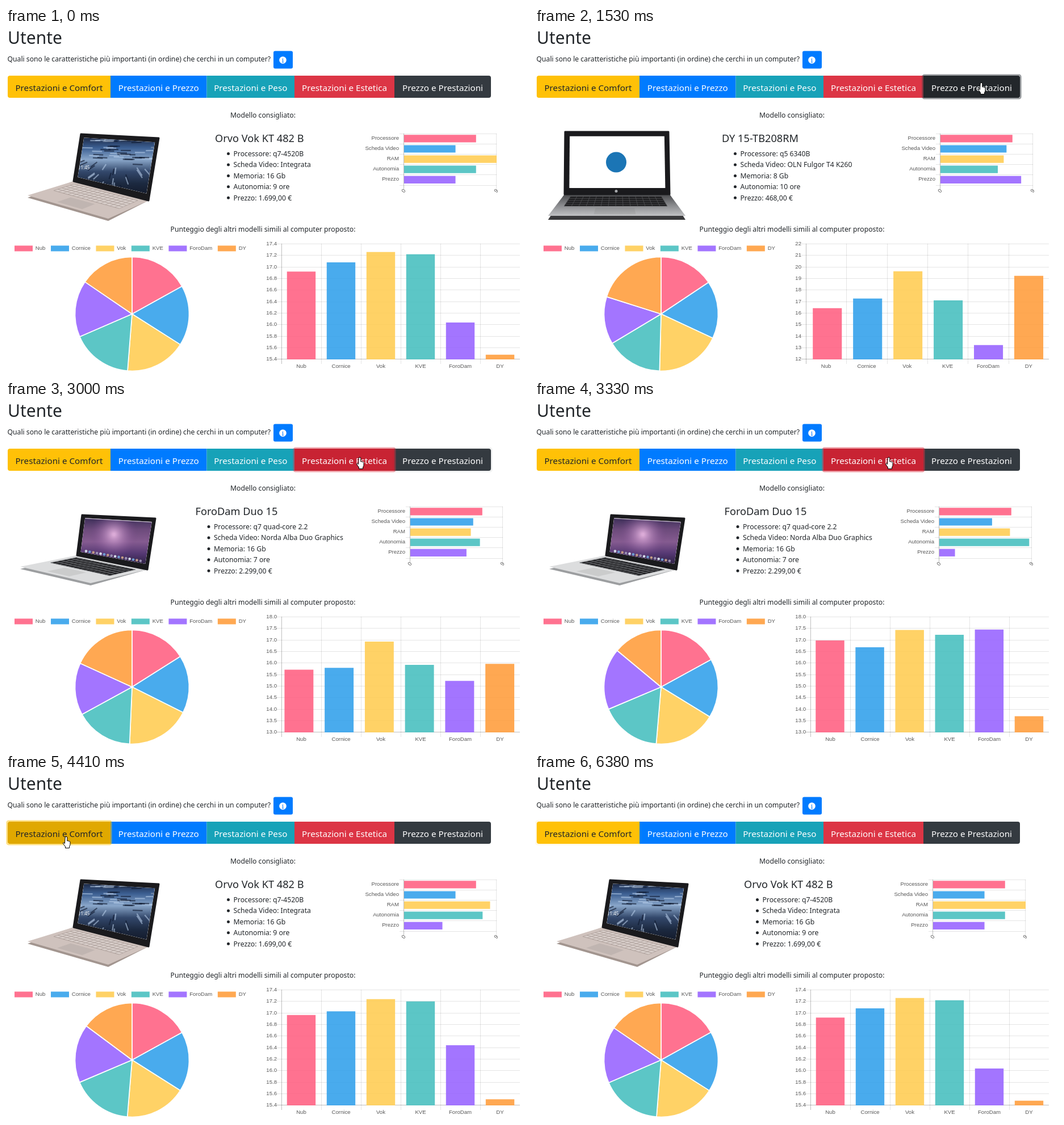
Recreate the animation shown at these times as an HTML page with a canvas. Size 921x608 px, loop 6.48 s.

```html
<!DOCTYPE html>
<html lang="it">
<head>
<meta charset="utf-8">
<title>Utente</title>
<style>
  html, body { margin: 0; width: 100%; height: 100%; overflow: hidden; background: #fff; }
  canvas { display: block; }
</style>
</head>
<body>
<canvas id="stage" width="921" height="608"></canvas>
<script>
const ctx = document.getElementById("stage").getContext("2d");
const LOOP = 6480, CHART_SPAN = 920, FADE = 150;
const INK = "#212529", GRID = "rgba(0,0,0,.1)", AXIS = "rgba(0,0,0,.25)";
const UI = '"Noto Sans", sans-serif', CHART = '"Liberation Sans", Arial, sans-serif';
const COLORS = ["255,99,132", "54,162,235", "255,206,86", "75,192,192", "153,102,255", "255,159,64"].map(c => `rgba(${c},.9)`);
const BRANDS = ["Nub", "Cornice", "Vok", "KVE", "ForoDam", "DY"];
const TRAITS = ["Processore", "Scheda Video", "RAM", "Autonomia", "Prezzo"];
const SPECS = ["Processore", "Scheda Video", "Memoria", "Autonomia", "Prezzo"];

const BUTTONS = [
  { label: "Prestazioni e Comfort", end: 184, rgb: "255,193,7", dark: "#e0a800", ink: INK },
  { label: "Prestazioni e Prezzo", end: 353.5, rgb: "0,123,255", dark: "#0069d9" },
  { label: "Prestazioni e Peso", end: 508, rgb: "23,162,184", dark: "#138496" },
  { label: "Prestazioni e Estetica", end: 684, rgb: "220,53,69", dark: "#c82333" },
  { label: "Prezzo e Prestazioni", end: 854, rgb: "52,58,64", dark: "#23272b" }
];
BUTTONS.forEach((b, i) => b.x = i ? BUTTONS[i - 1].end : 3);
const [COMFORT, , , STYLE, PRICE] = BUTTONS;

const slim = {
  title: "Orvo Vok KT 482 B", x: 368, axisX: 701, photo: slimPhoto,
  specs: ["q7-4520B", "Integrata", "16 Gb", "9 ore", "1.699,00 €"],
  rating: [7, 5, 9, 7, 5], share: [16.92, 17.08, 17.26, 17.22, 16.04, 15.48]
};
const budget = {
  title: "DY 15-TB208RM", x: 329, axisX: 714, photo: budgetPhoto,
  specs: ["q5 6340B", "OLN Fulgor T4 K260", "8 Gb", "10 ore", "468,00 €"],
  rating: [7, 7, 5, 5, 9], share: [15.15, 16, 18.95, 15.5, 12.45, 22]
};
const silver = {
  title: "ForoDam Duo 15", x: 333.5, axisX: 712, photo: silverPhoto,
  specs: ["q7 quad-core 2.2", "Norda Alba Duo Graphics", "16 Gb", "7 ore", "2.299,00 €"],
  rating: [7, 5, 7, 9, 1], share: [17.15, 16.8, 17.5, 17.4, 17.75, 13.4]
};
const PHASES = [
  { at: -1000, model: slim },
  { at: 1285, model: budget, focus: PRICE },
  { at: 2876, model: silver, focus: STYLE },
  { at: 4182, model: slim, focus: COMFORT },
  { at: 6265, model: slim }
];
const MOVES = [
  { from: 400, to: 640, x: 706, y: 94 },
  { from: 640, to: 880, x: 819, y: 95 },
  { from: 1480, to: 1860, x: 725, y: 101 },
  { from: 1980, to: 2430, x: 623, y: 100 },
  { from: 3530, to: 3900, x: 106, y: 111 },
  { from: 4440, to: 4570, x: 30, y: 150 }
];
const HAND = new Path2D("M-1.8 1a1.8 1.8 0 0 1 3.6 0V7l1-.3 1.6.5 1 .3 1.6 1V14l-1.5 3v2.5h-7V17l-3.6-5q-1-2 .6-2.2l1.9 1.7z");
const ARROW = new Path2D("M0 0V14l3.3-3 2.2 5 2-1-2.2-4.8H10z");

const clamp = v => Math.max(0, Math.min(1, v));
const mix = (a, b, p) => a + (b - a) * p;
const mixAll = (a, b, p) => a.map((v, i) => mix(v, b[i], p));
const easeOut = (v, power) => 1 - (1 - clamp(v)) ** power;
const random = seed => Math.abs(Math.sin(seed * 91.7) * 43758.5) % 1;
const times = (n, draw) => { for (let i = 0; i < n; i++) draw(i); };

function text(str, x, y, size, { font = UI, color = INK, align = "left", base = "alphabetic" } = {}) {
  ctx.font = `${size}px ${font}`;
  ctx.fillStyle = color;
  ctx.textAlign = align;
  ctx.textBaseline = base;
  ctx.fillText(str, x, y);
}
const chartText = (str, x, y, align) => text(str, x, y, 9.6, { font: CHART, color: "#595959", align, base: "middle" });
function chartWidth(str) {
  ctx.font = `9.6px ${CHART}`;
  return ctx.measureText(str).width;
}
function rect(x, y, w, h, fill, radius = 0) {
  ctx.fillStyle = fill;
  ctx.beginPath();
  ctx.roundRect(x, y, w, h, radius);
  ctx.fill();
}
function disc(x, y, r, fill) {
  ctx.fillStyle = fill;
  ctx.beginPath();
  ctx.arc(x, y, r, 0, 7);
  ctx.fill();
}
function line(x1, y1, x2, y2, color = GRID, width = 1) {
  ctx.strokeStyle = color;
  ctx.lineWidth = width;
  ctx.beginPath();
  ctx.moveTo(x1, y1);
  ctx.lineTo(x2, y2);
  ctx.stroke();
}
function poly(points, fill) {
  ctx.fillStyle = fill;
  ctx.beginPath();
  points.forEach(p => ctx.lineTo(...p));
  ctx.closePath();
  ctx.fill();
}
function fade(y1, y2, ...colors) {
  const g = ctx.createLinearGradient(0, y1, 0, y2);
  colors.forEach((c, i) => g.addColorStop(i / (colors.length - 1), c));
  return g;
}

// A quad is [top left, top right, bottom right, bottom left]; u and v run from 0 to 1 across it.
const at = ([a, b, c, d], u, v) => mixAll(mixAll(a, b, u), mixAll(d, c, u), v);
const patch = (quad, u1, v1, u2, v2) => [[u1, v1], [u2, v1], [u2, v2], [u1, v2]].map(([u, v]) => at(quad, u, v));

function laptop({ top, hinge, front, thick, shell, edge, keys, gap }, paintScreen) {
  const lid = [...top, hinge[1], hinge[0]], deck = [...hinge, front[1], front[0]];
  poly([hinge[0], hinge[1], ...[1, 0].map(i => [front[i][0], front[i][1] + thick])], edge);
  poly(deck, shell);
  const keyboard = patch(deck, .07, .1, .91, .55);
  poly(keyboard, keys);
  times(15, i => line(...at(keyboard, i / 14, 0), ...at(keyboard, i / 14, 1), gap, .7));
  times(6, i => line(...at(keyboard, 0, i / 5), ...at(keyboard, 1, i / 5), gap, .9));
  poly(patch(deck, .33, .63, .64, .93), "rgba(110,110,115,.16)");
  ctx.lineJoin = "round";
  ctx.lineWidth = 3;
  ctx.strokeStyle = "#1a1a1d";
  poly(lid, "#1a1a1d");
  ctx.stroke();
  const screen = patch(lid, .045, .07, .96, .9);
  ctx.save();
  poly(screen, "#fff");
  ctx.clip();
  paintScreen(screen);
  ctx.restore();
}

function slimPhoto() {
  laptop({
    top: [[132, 187], [269, 194]], hinge: [[119, 270], [251, 304]], front: [[38, 295], [180, 336]],
    thick: 4, shell: "#cfc2bd", edge: "#a2958f", keys: "#d8ceca", gap: "#a89a95"
  }, screen => {
    poly(screen, fade(190, 295, "#172039", "#3c5f92", "#8aa7ca", "#33486b", "#1c2940", "#131a2a"));
    times(70, i => {
      const u = random(i + 1), v = random(i + 101), dark = i % 2;
      const spread = (u - .5) * .3;
      line(...at(screen, u, v), ...at(screen, u + (v > .5 ? spread : .14), v + (v > .5 ? .14 : -.02)),
        dark ? "rgba(14,24,46,.6)" : "rgba(190,212,238,.55)", 2.2);
    });
    text("11:45", 127, 249, 8, { color: "#fff" });
  });
}

function budgetPhoto() {
  laptop({
    top: [[53, 183], [235, 183]], hinge: [[52, 293], [237, 293]], front: [[23, 331], [265, 331]],
    thick: 7, shell: fade(293, 331, "#48494c", "#88898c", "#c0c1c3"), edge: "#3a3a3c", keys: "#19191b", gap: "#58595c"
  }, () => disc(143, 236.5, 18, "#1b75b5"));
  disc(143, 287.5, 2.5, "#a7a9ac");
}

function silverPhoto() {
  laptop({
    top: [[134, 201], [263, 207]], hinge: [[125, 272], [249, 297]], front: [[25, 292], [149, 321]],
    thick: 4, shell: "#dcddde", edge: "#9c9ea0", keys: "#1c1c1f", gap: "#727478"
  }, screen => {
    poly(screen, fade(206, 290, "#3c2e58", "#6d4b7c", "#855b90", "#553873", "#281e3e"));
    const glow = ctx.createRadialGradient(190, 235, 2, 190, 235, 42);
    glow.addColorStop(0, "rgba(244,193,236,.8)");
    glow.addColorStop(1, "rgba(120,70,140,0)");
    poly(screen, glow);
    line(...at(screen, 0, 0), ...at(screen, 1, 0), "#d5cadb", 2);
    times(16, i => disc(...at(screen, .08 + i * .056, .95), 2.3, ["#d6dce8", "#6f9ed2", "#c19b85", "#9a91b2"][i % 4]));
  });
}

const phaseIndex = t => PHASES.findLastIndex(p => t >= p.at);

function pointerAt(t) {
  const end = MOVES.at(-1).to;
  if (t < MOVES[0].from || t > end) return null;
  const index = MOVES.findLastIndex(m => t >= m.from);
  const move = MOVES[index], start = MOVES[index - 1] || { x: 920, y: 73 };
  const p = easeOut((t - move.from) / (move.to - move.from), 3);
  return { x: mix(start.x, move.x, p), y: mix(start.y, move.y, p) };
}
function hoveredAt(t) {
  const p = pointerAt(t);
  return p && p.y >= 84 && p.y < 123 ? BUTTONS.find(b => p.x >= b.x && p.x < b.end) : undefined;
}
// Share of the last FADE ms in which a state held: a transition without stored history.
function recent(t, holds) {
  const samples = 15;
  let count = 0;
  times(samples, i => count += holds(t - (i + .5) * FADE / samples));
  return count / samples;
}

function header(t) {
  text("Utente", 3, 28, 30);
  text("Quali sono le caratteristiche più importanti (in ordine) che cerchi in un computer?", 2.5, 59, 12.2);
  rect(471, 40.5, 34, 31, "#007bff", 3);
  disc(487.5, 56.5, 6.3, "#fff");
  text("i", 487.5, 60.5, 11, { font: '"Noto Serif", serif', color: "#007bff", align: "center" });

  BUTTONS.forEach((b, i) => {
    const w = b.end - b.x, radius = i === 0 ? [4, 0, 0, 4] : i === 4 ? [0, 4, 4, 0] : 0;
    rect(b.x, 84, w, 39, `rgb(${b.rgb})`, radius);
    ctx.globalAlpha = recent(t, s => hoveredAt(s) === b);
    rect(b.x, 84, w, 39, b.dark, radius);
    ctx.globalAlpha = 1;
    text(b.label, b.x + w / 2, 111, 15.2, { color: b.ink || "#fff", align: "center" });
  });
  for (const b of BUTTONS) {
    const ring = recent(t, s => PHASES[phaseIndex(s)].focus === b);
    ctx.strokeStyle = `rgba(${b.rgb},${ring * .5})`;
    ctx.lineWidth = 2.6;
    ctx.beginPath();
    ctx.roundRect(b.x - 1.3, 82.7, b.end - b.x + 2.6, 41.6, 3);
    ctx.stroke();
  }
}

function details(m) {
  text("Modello consigliato:", 452.5, 158, 12.2, { align: "center" });
  text("Punteggio degli altri modelli simili al computer proposto:", 452.5, 358.5, 12.2, { align: "center" });
  m.photo();
  text(m.title, m.x, 201, 18.2);
  SPECS.forEach((name, i) => {
    const y = 221.5 + i * 19.45;
    disc(m.x + 23.5, y, 2.5, INK);
    text(`${name}: ${m.specs[i]}`, m.x + 32.5, y + 4.5, 12.2);
  });
}

function ratingChart(x, ratings) {
  const unit = 163 / 9, row = 18.1;
  times(6, i => {
    const y = Math.round(186 + i * row) + .5;
    line(x - 8, y, x + 163, y);
  });
  for (const v of [0, 9]) {
    const tickX = x + v * unit - .5;
    line(tickX, 186, tickX, 284, v ? GRID : AXIS);
    ctx.save();
    ctx.translate(tickX, 284);
    ctx.rotate(-50 * Math.PI / 180);
    chartText(v, 0, 2, "right");
    ctx.restore();
  }
  TRAITS.forEach((name, i) => {
    rect(x, 188.3 + i * row, ratings[i] * unit, 13.2, COLORS[i]);
    chartText(name, x - 9, 194.7 + i * 18, "right");
  });
}

function pieChart(shares) {
  let x = 15;
  BRANDS.forEach((name, i) => {
    rect(x, 383.5, 32, 10, COLORS[i]);
    chartText(name, x + 36.8, 388, "left");
    x += 46.4 + chartWidth(name);
  });
  const total = shares.reduce((a, b) => a + b);
  let from = -Math.PI / 2;
  shares.forEach((share, i) => {
    const to = from + share / total * Math.PI * 2;
    ctx.beginPath();
    ctx.moveTo(222, 504);
    ctx.arc(222, 504, 100.5, from, to);
    ctx.closePath();
    ctx.fillStyle = COLORS[i];
    ctx.fill();
    ctx.strokeStyle = "#fff";
    ctx.lineWidth = 1.7;
    ctx.lineJoin = "bevel";
    ctx.stroke();
    from = to;
  });
}

// Ten intervals of a round step that cover the data; the plot starts after the widest label.
function barScale({ share }) {
  const low = Math.min(...share), range = Math.max(...share) - low;
  const power = 10 ** Math.floor(Math.log10(range));
  const step = [1, 2, 5, 10].find(n => n * power >= range) * power / 10;
  const min = Math.floor(low / step) * step;
  const labels = Array.from({ length: 11 }, (_, i) => (min + i * step).toFixed(step < 1 ? 1 : 0));
  return { labels, left: 466.3 + chartWidth(labels[10]), heights: share.map(v => (v - min) / step) };
}

function barChart(before, model, p) {
  const right = 905, bottom = 583.4, gap = 20.35;
  const old = barScale(before), { labels, left, heights } = barScale(model);
  labels.forEach((label, i) => {
    const y = Math.round(bottom - i * gap) + .5;
    line(left - 8, y, right, y, i ? GRID : AXIS);
    chartText(label, left - 8, y - .5, "right");
  });
  const slot = (right - left) / 6, barLeft = mix(old.left, left, p), barSlot = (right - barLeft) / 6;
  BRANDS.forEach((name, i) => {
    const x = Math.round(left + i * slot) + .5;
    line(x, 380, x, 592, i ? GRID : AXIS);
    chartText(name, left + (i + .5) * slot, 596, "center");
    const h = mix(old.heights[i], heights[i], p) * gap;
    rect(barLeft + (i + .14) * barSlot, 584 - h, barSlot * .72, h, COLORS[i]);
  });
}

function drawPointer(t) {
  const p = pointerAt(t);
  if (!p) return;
  const shape = hoveredAt(t) ? HAND : ARROW;
  ctx.save();
  ctx.translate(p.x, p.y);
  ctx.fillStyle = "#fff";
  ctx.strokeStyle = "#000";
  ctx.lineWidth = 1;
  ctx.fill(shape);
  ctx.stroke(shape);
  ctx.restore();
}

function render(now) {
  const t = now % LOOP, index = phaseIndex(t);
  const { at: start, model } = PHASES[index];
  const before = PHASES[Math.max(0, index - 1)].model;
  const p = easeOut((t - start) / CHART_SPAN, 4);

  ctx.fillStyle = "#fff";
  ctx.fillRect(0, 0, 921, 608);
  header(t);
  details(model);
  ratingChart(model.axisX, mixAll(before.rating, model.rating, p));
  pieChart(mixAll(before.share, model.share, p));
  barChart(before, model, p);
  drawPointer(t);
}

const started = performance.now();
function tick() {
  render(performance.now() - started);
  requestAnimationFrame(tick);
}
tick();
</script>
</body>
</html>
```
